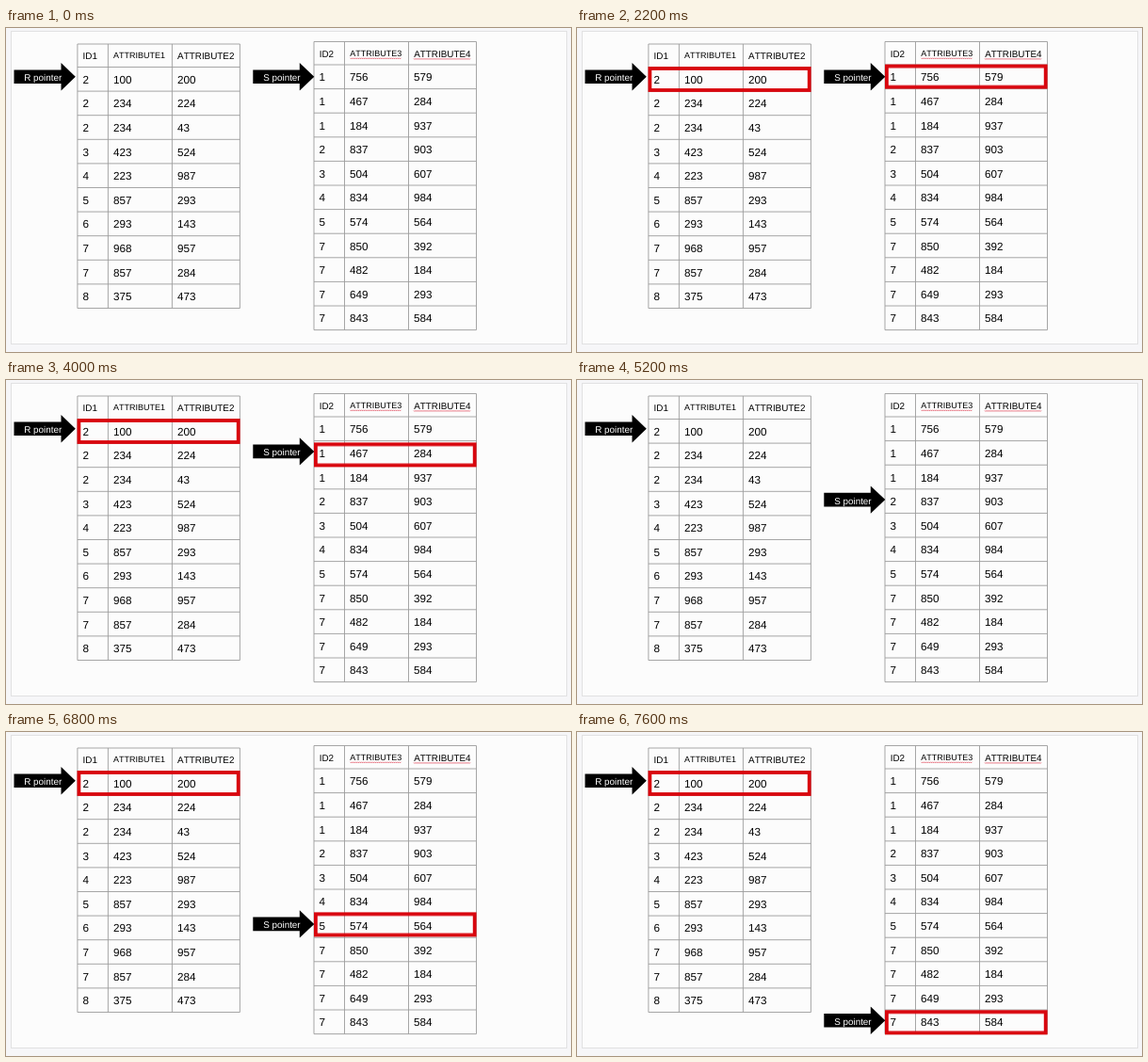
Write an HTML page that moves like this. It is 600 by 344 pixels and loops after 8 s.

```html
<!DOCTYPE html>
<html lang="en">
<head>
<meta charset="utf-8">
<title>Merge join pointers</title>
<style>
  html, body { margin: 0; width: 100%; height: 100%; overflow: hidden; background: #f6f6f8; }
  svg { display: block; width: 600px; height: 344px; }
  text { font-family: "Liberation Sans", Arial, sans-serif; font-kerning: none; text-rendering: geometricPrecision; }
  .panel { fill: #fcfcfc; stroke: #e1e1e2; }
  .grid { fill: none; stroke: #9c9c9c; stroke-width: .9; }
  .wave { fill: none; stroke: #e0475a; stroke-width: .8; }
  .mark { fill: none; stroke: #d9060e; stroke-width: 3.8; }
  .label { fill: #fff; font-size: 9.9px; text-anchor: middle; }

  .marks { animation: blink 8s step-end infinite; }
  #sMark { animation: mark 8s step-end infinite; }
  #sArrow { animation: arrow 8s step-end infinite; }

  @keyframes blink {
    0%, 65% { visibility: hidden; }
    27.5%, 72.5%, 100% { visibility: visible; }
  }
  @keyframes arrow {
    0% { transform: translateY(51.7px); }
    42.5% { transform: translateY(75.9px); }
    55% { transform: translateY(101.5px); }
    65% { transform: translateY(127.1px); }
    72.5% { transform: translateY(152.7px); }
    80% { transform: translateY(178.3px); }
    85% { transform: translateY(203.9px); }
    87.5% { transform: translateY(229.5px); }
    90% { transform: translateY(255.1px); }
    92.5% { transform: translateY(280.7px); }
    95%, 100% { transform: translateY(306.3px); }
  }
  @keyframes mark {
    0% { transform: translateY(38.6px); }
    42.5% { transform: translateY(66.4px); }
    55% { transform: translateY(90.4px); }
    72.5% { transform: translateY(140px); }
    80% { transform: translateY(168px); }
    85% { transform: translateY(191.4px); }
    87.5% { transform: translateY(218px); }
    90% { transform: translateY(243.6px); }
    92.5% { transform: translateY(269.2px); }
    95%, 100% { transform: translateY(295.3px); }
  }
</style>
</head>
<body>
<svg viewBox="0 0 600 344">
  <rect class="panel" x="5.5" y="3.5" width="590" height="332"/>
  <g id="tables"></g>
  <g class="marks">
    <rect class="mark" x="77.4" y="43" width="169.3" height="23"/>
    <g id="sMark"><rect class="mark" x="328.9" y="1.9" width="168.8" height="22.2"/></g>
  </g>
  <g transform="translate(8.5 51.7)">
    <path d="M0-7.3H50V-14.7L65.3 0 50 14.7V7.3H0Z"/>
    <text class="label" x="30.7" y="4.4">R pointer</text>
  </g>
  <g id="sArrow">
    <g transform="translate(262.3 0)">
      <path d="M0-7.3H49.5V-14.7L65 0 49.5 14.7V7.3H0Z"/>
      <text class="label" x="30.6" y="4.4">S pointer</text>
    </g>
  </g>
</svg>
<script>
  const ROW = 25.6, HEAD = 24.5;
  const COLS = [0, 32.5, 100.5, 172.5];
  const HEAD_SIZE = [9.9, 9, 9.9];
  const root = document.getElementById('tables');

  function add(tag, attrs, text = '') {
    const el = document.createElementNS('http://www.w3.org/2000/svg', tag);
    for (const key in attrs) el.setAttribute(key, attrs[key]);
    el.textContent = text;
    root.append(el);
  }

  function table(x, y, heads, rows) {
    const bottom = y + HEAD + ROW * rows.length;
    let grid = `M${x} ${y}h${COLS[3]}`;
    for (let i = 0; i <= rows.length; i++) grid += `M${x} ${y + HEAD + i * ROW}h${COLS[3]}`;
    for (const c of COLS) grid += `M${x + c} ${y}V${bottom}`;
    add('path', { class: 'grid', d: grid });

    heads.forEach((h, c) => add('text', {
      x: x + COLS[c] + 5.7, y: y + (c === 1 ? 15.3 : 16.1), 'font-size': HEAD_SIZE[c]
    }, h));
    rows.forEach((row, r) => row.split(' ').forEach((value, c) => add('text', {
      x: x + COLS[c] + 5.5, y: y + 41.8 + r * ROW, 'font-size': 11.7
    }, value)));
  }

  function wave(x, y, width) {
    let d = `M${x} ${y}`;
    for (let i = 0; i < width / 2; i++) d += 'l1 1l1-1';
    add('path', { class: 'wave', d });
  }

  table(75.9, 17, ['ID1', 'ATTRIBUTE1', 'ATTRIBUTE2'], [
    '2 100 200', '2 234 224', '2 234 43', '3 423 524', '4 223 987',
    '5 857 293', '6 293 143', '7 968 957', '7 857 284', '8 375 473'
  ]);
  table(327, 14.5, ['ID2', 'ATTRIBUTE3', 'ATTRIBUTE4'], [
    '1 756 579', '1 467 284', '1 184 937', '2 837 903', '3 504 607', '4 834 984',
    '5 574 564', '7 850 392', '7 482 184', '7 649 293', '7 843 584'
  ]);
  wave(365.5, 31.8, 54);
  wave(433, 32.4, 59);
</script>
</body>
</html>
```
